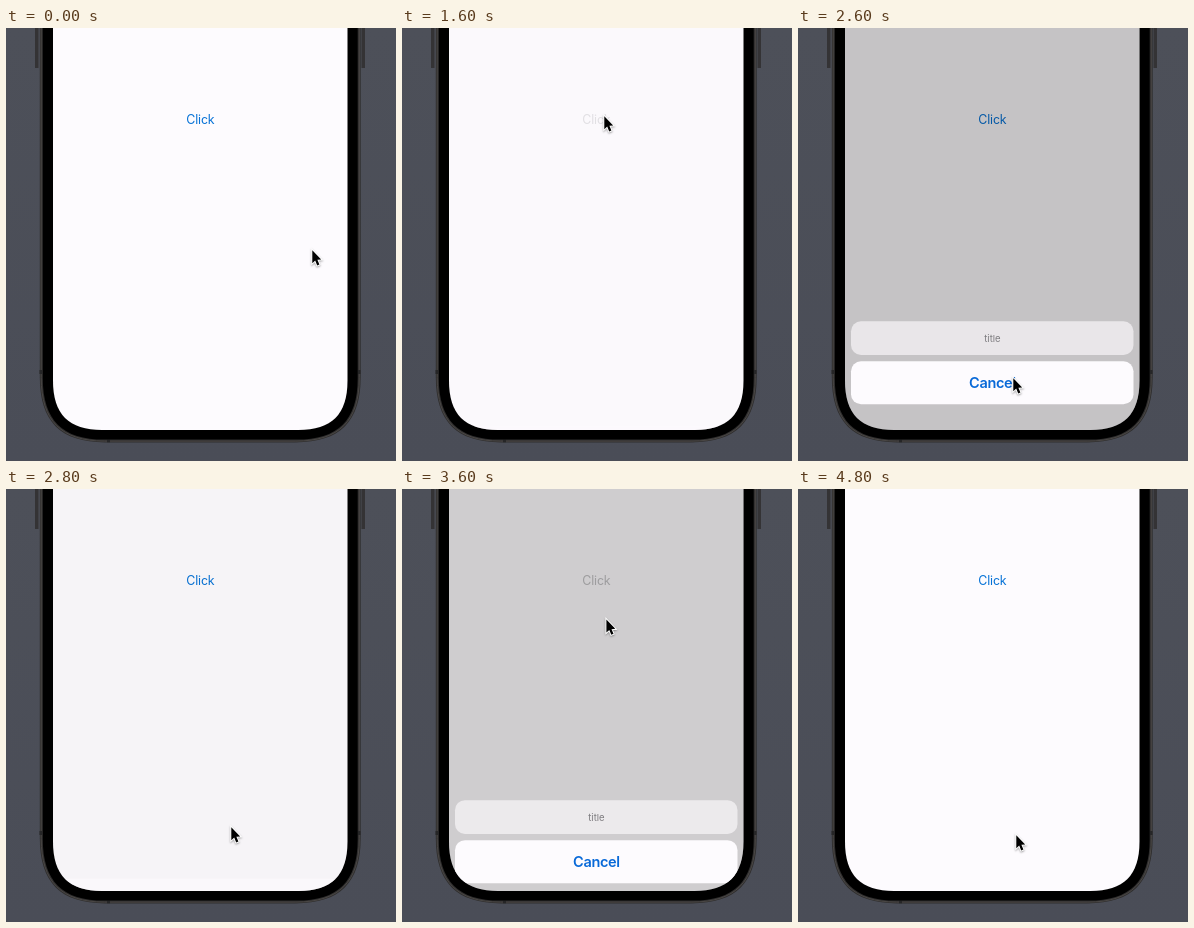
Animation, 390 px wide and 433 px high, one loop 4900 ms. Source, as an HTML page with a canvas:

```html
<!DOCTYPE html>
<html lang="en">
<head>
<meta charset="utf-8">
<title>Action sheet</title>
<style>
html, body { margin: 0; width: 100%; height: 100%; overflow: hidden; background: #4b4e58; }
canvas { display: block; width: 390px; height: 433px; }
</style>
</head>
<body>
<canvas id="stage"></canvas>
<script>
const W = 390, H = 433, LOOP = 4900, STEP = 100;
const canvas = document.getElementById('stage');
const ctx = canvas.getContext('2d');
const ratio = window.devicePixelRatio || 1;
canvas.width = W * ratio;
canvas.height = H * ratio;
ctx.scale(ratio, ratio);

const PAPER = '#fdfbfe';
const SHEET_TRAVEL = 109;
const SPRING = 18.5;
const BUTTON = [202, 87], CANCEL = [215, 349];

// Each visit: sheet opens, pointer leaves for Cancel, sheet closes, pointer rests.
const visits = [
  { open: 1584, leave: 1880, close: 2600, rest: [225, 337] },
  { open: 3424, leave: 3465, close: 4400, rest: [218, 345] }
];

// Pointer keys [time, x, y]: a loose loop, then trips between the two buttons
const pointer = [
  [200, 306, 221], [400, 262, 279], [600, 184, 160], [800, 204, 88],
  [1000, 239, 175], [1200, 210, 257],
  ...visits.flatMap(v => [
    [v.open - 200, ...BUTTON],
    [v.leave, ...BUTTON],
    [v.leave + 530, ...CANCEL],
    [v.close, ...CANCEL],
    [v.close + 200, ...v.rest]
  ])
];

const clamp = v => Math.max(0, Math.min(1, v));
const mix = (a, b, p) => a + (b - a) * p;
const smooth = p => p * p * (3 - 2 * p);

// Critically damped approach from 0 to 1
function spring(ms) {
  const u = SPRING * Math.max(0, ms) / 1000;
  return 1 - (1 + u) * Math.exp(-u);
}

function pointerAt(t) {
  const next = pointer.findIndex(k => k[0] > t);
  const b = pointer.at(next);
  const a = pointer[next - 1] || b;
  const p = a === b ? 0 : smooth(clamp((t - a[0]) / (b[0] - a[0])));
  return [mix(a[1], b[1], p), mix(a[2], b[2], p)];
}

function stateAt(t) {
  const s = { shown: 0, alpha: 1, gray: false, held: false };
  for (const v of visits) {
    if (t < v.open - 120) continue;
    s.shown = spring(t - v.open) * (1 - spring(t - v.close));
    s.gray = t >= v.open && t < v.close;
    s.alpha = t >= v.close ? 1 : mix(0.2, 1, clamp((t - v.open) / 400));
    s.held = t >= v.close - 160 && t < v.close;
  }
  return s;
}

// Phone outline grown outward from the screen edge, running off the top
function phonePath(grow) {
  const l = 47 - grow, r = 341.5 + grow, b = 402 + grow * 0.94;
  const e = (41 + grow) * 1.2, k = e * 0.318;
  ctx.beginPath();
  ctx.moveTo(l, -10);
  ctx.lineTo(l, b - e);
  ctx.bezierCurveTo(l, b - k, l + k, b, l + e, b);
  ctx.lineTo(r - e, b);
  ctx.bezierCurveTo(r - k, b, r, b - k, r, b - e);
  ctx.lineTo(r, -10);
  ctx.closePath();
}

function fillPhone(grow, color) {
  phonePath(grow);
  ctx.fillStyle = color;
  ctx.fill();
}

function rect(x, y, w, h, color) {
  ctx.fillStyle = color;
  ctx.fillRect(x, y, w, h);
}

function panel(y, h, color) {
  ctx.beginPath();
  ctx.roundRect(53, y, 282.5, h, 10);
  ctx.fillStyle = color;
  ctx.fill();
}

function label(text, y, size, weight, color, spacing) {
  ctx.font = `${weight} ${size}px Inter, "Liberation Sans", sans-serif`;
  ctx.letterSpacing = spacing + 'px';
  ctx.textAlign = 'center';
  ctx.fillStyle = color;
  ctx.fillText(text, 194.4, y);
}

function drawPhone() {
  const wall = ctx.createLinearGradient(0, 0, 0, H);
  wall.addColorStop(0, '#4d5059');
  wall.addColorStop(1, '#4a4d57');
  rect(0, 0, W, H, wall);

  for (const x of [29, 355.5]) rect(x, 0, 3.5, 40, '#343335');

  fillPhone(13.2, '#2f2e2e');
  phonePath(11.8);
  ctx.strokeStyle = '#4a4745';
  ctx.lineWidth = 1;
  ctx.stroke();
  for (const x of [33.5, 352]) rect(x, 342, 2.5, 4, '#262627');
  rect(101, 411.5, 3, 2.8, '#262627');
  fillPhone(10.2, '#000');
}

function drawScreen(s) {
  ctx.save();
  phonePath(0);
  ctx.clip();
  rect(40, 0, 310, 410, PAPER);

  ctx.globalAlpha = s.alpha;
  label('Click', 96, 12.4, 400, s.gray ? '#8f8f91' : '#0672d6', -0.15);
  ctx.globalAlpha = 1;

  rect(40, 0, 310, 410, `rgba(0,0,0,${0.222 * s.shown})`);

  if (s.shown > 0.004) {
    const y = 293.3 + SHEET_TRAVEL * (1 - s.shown);
    panel(y, 33.7, 'rgba(253,251,254,0.64)');
    label('title', y + 20.6, 9.5, 400, '#7d7c7f', 0);
    panel(y + 40, 43, s.held ? '#e9e8eb' : PAPER);
    label('Cancel', y + 66.9, 14.5, 600, '#0869d8', -0.35);
  }
  ctx.restore();
}

function drawPointer(x, y) {
  ctx.save();
  ctx.translate(x + 0.3, y + 1.2);
  ctx.beginPath();
  ctx.moveTo(0, 0);
  ctx.lineTo(0, 13);
  ctx.lineTo(2.9, 10.4);
  ctx.lineTo(4.9, 15.2);
  ctx.lineTo(7.1, 14.2);
  ctx.lineTo(5.1, 9.6);
  ctx.lineTo(8.9, 9.3);
  ctx.closePath();
  ctx.lineWidth = 2;
  ctx.strokeStyle = '#fff';
  ctx.shadowColor = 'rgba(0,0,0,0.35)';
  ctx.shadowBlur = 2 * ratio;
  ctx.shadowOffsetY = ratio;
  ctx.stroke();
  ctx.shadowColor = 'transparent';
  ctx.fillStyle = '#000';
  ctx.fill();
  ctx.restore();
}

function draw() {
  // Ten pictures a second, with a little slack for late frames
  const t = Math.floor((performance.now() + 20) / STEP) * STEP % LOOP;
  drawPhone();
  drawScreen(stateAt(t));
  drawPointer(...pointerAt(t));
  requestAnimationFrame(draw);
}
draw();
</script>
</body>
</html>
```
